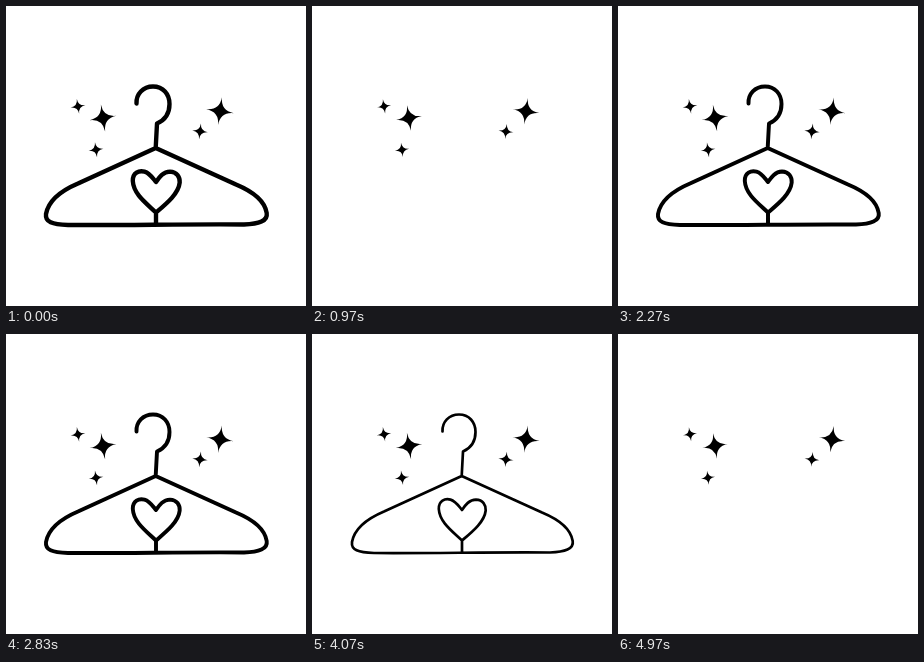
Animation, 300 px wide and 300 px high, one loop 5.01 s. Source, as an HTML page with a canvas:

```html
<!DOCTYPE html>
<html lang="en">
<head>
<meta charset="utf-8">
<title>Sparkling hanger</title>
<style>
  html, body { margin: 0; width: 100%; height: 100%; overflow: hidden; background: #fff; }
  canvas { display: block; width: 100vw; height: 100vh; }
</style>
</head>
<body>
<canvas id="stage"></canvas>
<script>
const SIZE = 300, LOOP = 5010, BEAT = LOOP / 9;
const canvas = document.getElementById('stage');
const ctx = canvas.getContext('2d');
const dpr = window.devicePixelRatio || 1;
canvas.width = canvas.height = SIZE * dpr;

const hanger = new Path2D(
  // hook
  'M130.5 97.5C130 88 137 80.5 147 80.5C157 80.5 163.5 88 163.5 98' +
  'C163.5 107 159 114 151 117.5L149.7 142' +
  // shoulders and bar
  'L72 177.5C52 186 42 197 40 208C39 216 46 218.5 62 219' +
  'C120 219.4 180 218 238 218.5C253 218 262 215 260.7 207' +
  'C259 196 248 186 230 178.5L149.7 142' +
  // heart and stem
  'M150 206.5C140 197 127.5 188 126.8 175C126.6 166.5 133 164.2 138.5 165.6' +
  'C143.5 167 146 171 150 176C153.5 171 157 165.8 164 165.6' +
  'C171 165.8 174 171 173.7 176.5C172.5 188 160 198 150 206.5V218'
);

// x, y, radius, tilt in degrees
const sparkles = [
  [72, 100.3, 7.5, -9],
  [97, 112, 13.6, -9],
  [90, 143.8, 7.5, -8],
  [194, 125.4, 7.9, 7],
  [214, 105.2, 14, 8]
];

function drawSparkle([x, y, r, tilt], scale) {
  const waist = r * 0.04;
  ctx.save();
  ctx.translate(x, y);
  ctx.rotate(tilt * Math.PI / 180);
  ctx.scale(scale, scale);
  ctx.beginPath();
  ctx.moveTo(0, -r);
  ctx.quadraticCurveTo(waist, -waist, r, 0);
  ctx.quadraticCurveTo(waist, waist, 0, r);
  ctx.quadraticCurveTo(-waist, waist, -r, 0);
  ctx.quadraticCurveTo(-waist, -waist, 0, -r);
  ctx.fill();
  ctx.restore();
}

// The line thins quickly, lingers, then vanishes until the next beat.
function lineWidth(t) {
  if (t >= BEAT * 2 / 3) return 0;
  return Math.max(2.7, 4.4 - t / 100);
}

function draw(time) {
  const beat = time % LOOP % BEAT;
  ctx.setTransform(dpr, 0, 0, dpr, 0, 0);
  ctx.fillStyle = '#fff';
  ctx.fillRect(0, 0, SIZE, SIZE);
  ctx.fillStyle = ctx.strokeStyle = '#000';
  ctx.lineCap = ctx.lineJoin = 'round';

  const width = lineWidth(beat);
  if (width) {
    ctx.lineWidth = width;
    ctx.stroke(hanger);
  }
  const scale = 1 - 0.06 * beat / BEAT;
  sparkles.forEach(s => drawSparkle(s, scale));
}

const start = performance.now();
function tick() {
  draw(performance.now() - start);
  requestAnimationFrame(tick);
}
tick();
</script>
</body>
</html>
```
